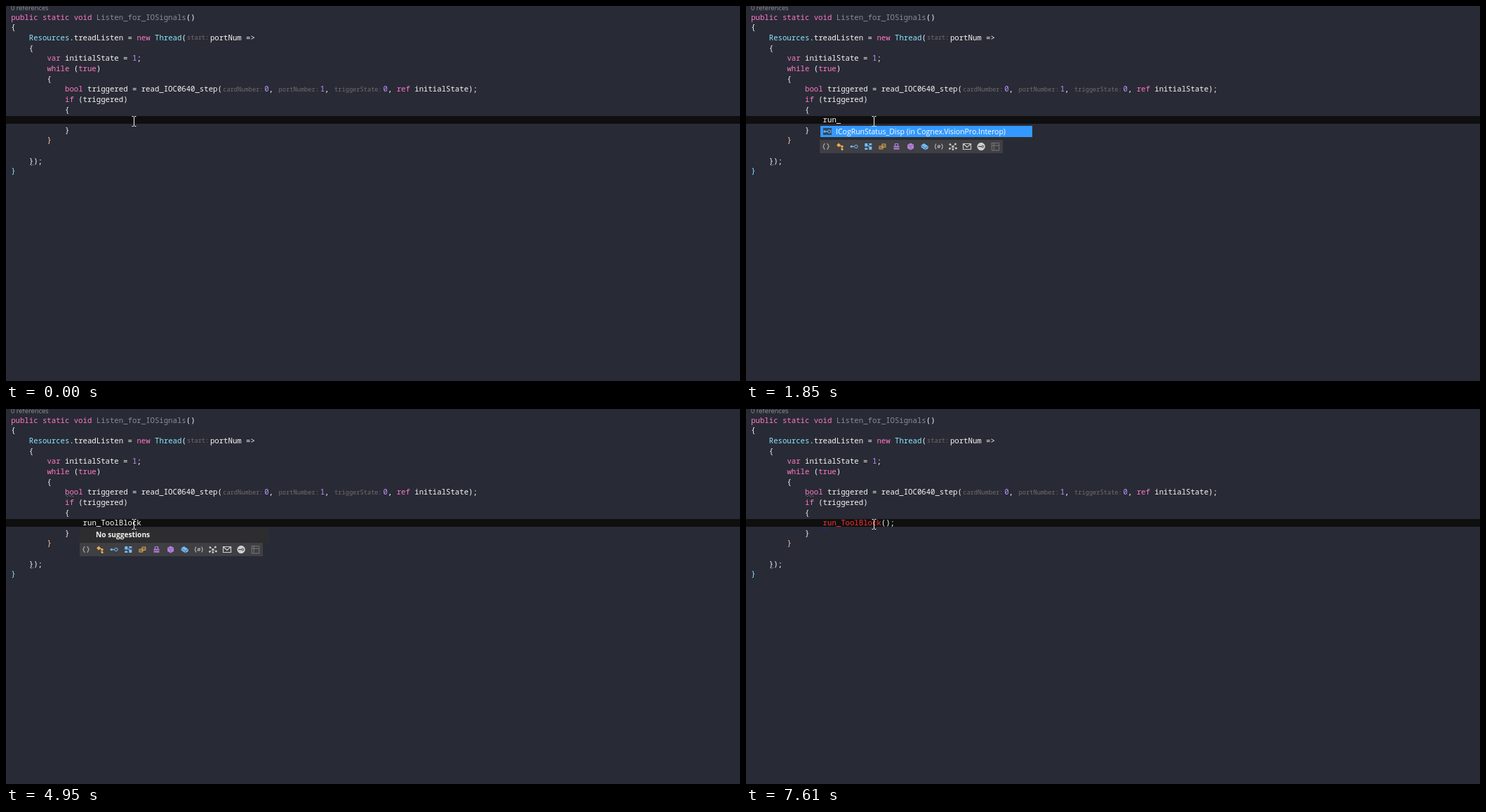
Animation, 1046 px wide and 535 px high, one loop 8000 ms. Source, as an HTML page:

```html
<!DOCTYPE html>
<html lang="en">
<head>
<meta charset="utf-8">
<title>Typing in a code editor</title>
<style>
html, body { margin: 0; width: 100%; height: 100%; overflow: hidden; background: #282a36; }
svg { display: block; width: 1046px; height: 535px; }
text { white-space: pre; }
.code { font: 10.667px "Noto Sans Mono", monospace; }
.hint { font: 8.7px "Noto Sans Mono", monospace; }
.ui { font: 10.5px "Open Sans", sans-serif; }
</style>
</head>
<body>
<svg id="stage" viewBox="0 0 1046 535" xmlns="http://www.w3.org/2000/svg"></svg>
<script>
const LOOP = 8000, LEFT = 7.2, CHAR = 6.4, LINE = 14.64, BASE = 19.8;
const INK = { w: '#f8f8f2', p: '#ff79c6', c: '#8be9fd', n: '#bd93f9', g: '#8c8d92', h: '#716d6b', o: '#ffc9a3', r: '#ff2f2f' };
const BLUE = '#75beff', ORANGE = '#e8ab53', PURPLE = '#b180d7', GREY = '#d0d0d0';

const rect = (x, y, w, h, fill, more = '') =>
  `<rect x="${x}" y="${y}" width="${w}" height="${h}" fill="${fill}" ${more}/>`;
const path = (d, stroke, width = 1, fill = 'none') =>
  `<path d="${d}" fill="${fill}" stroke="${stroke}" stroke-width="${width}"/>`;
const ring = (x, y, r, stroke, fill = 'none') =>
  `<circle cx="${x}" cy="${y}" r="${r}" fill="${fill}" stroke="${stroke}"/>`;
const label = (x, y, body, cls, fill, more = '') =>
  `<text x="${x}" y="${y}" class="${cls}" fill="${fill}" ${more}>${body}</text>`;
const at = (x, y, body) => `<g transform="translate(${x} ${y})">${body}</g>`;
const colX = col => LEFT + col * CHAR;
const lineY = row => BASE + row * LINE;

// Each run is a colour key followed by its text; "h" marks an inline parameter hint.
function codeLine(row, col, runs) {
  let x = colX(col);
  return runs.map(run => {
    const key = run[0], str = run.slice(1);
    if (key === 'h') {
      const hint = label(x + 1.2, lineY(row) - 0.6, str, 'hint', INK.h);
      x += str.length * 5.22 + 2.8;
      return hint;
    }
    const out = label(x, lineY(row), str.replace('>', '&gt;'), 'code', INK[key]);
    x += str.length * CHAR;
    return out;
  }).join('');
}

const program = [
  [0, 0, 'ppublic static void ', 'gListen_for_IOSignals', 'w()'],
  [1, 0, 'w{'],
  [2, 4, 'cResources', 'w.treadListen = ', 'pnew ', 'cThread', 'w(', 'hstart:', 'wportNum =>'],
  [3, 4, 'w{'],
  [4, 8, 'pvar ', 'winitialState = ', 'n1', 'w;'],
  [5, 8, 'pwhile ', 'w(', 'ptrue', 'w)'],
  [6, 8, 'w{'],
  [7, 12, 'pbool ', 'wtriggered = read_IOC0640_step(', 'hcardNumber:', 'n0', 'w, ', 'hportNumber:', 'n1', 'w, ',
    'htriggerState:', 'n0', 'w, ', 'pref ', 'winitialState);'],
  [8, 12, 'pif ', 'w(triggered)'],
  [9, 12, 'w{'],
  [11, 12, 'w}'],
  [12, 8, 'o}'],
  [14, 4, 'w});'],
  [15, 0, 'c}']
];

function dots(x, y, count, color) {
  let out = '';
  for (let i = 0; i < count; i++) out += rect(x + i * 2, y + i % 2, 1, 1, color);
  return out;
}

const icon = {
  braces: path('M-1.5-4Q-3-4-3-2.5T-4.5 0Q-3 0-3 2T-1.5 4M1.5-4Q3-4 3-2.5T4.5 0Q3 0 3 2T1.5 4', GREY),
  type: path('M-2-1H2V3H3', ORANGE) + path('M-5-2L-2-5L1-2L-2 1ZM1 0L3-2L5 0L3 2ZM1 4L3 2L5 4L3 6Z', 'none', 0, ORANGE),
  face: path('M-5 0H0', BLUE, 1.3) + ring(-4, 0, 1.2, BLUE) + ring(2.7, 0, 2.2, BLUE),
  struct: path('M-5-4.5H-1V0H-5ZM1-4.5H5V-2H1ZM-5 2H-1V4.5H-5ZM1 0H5V4.5H1Z', 'none', 0, BLUE) +
    path('M-1-1H1V1', BLUE),
  list: path('M-.5-3.5H4.5V1H-.5ZM-4.5-.5H.5V3.5H-4.5Z', ORANGE) + path('M1-1.2H3.5M-3.2 1.5H-.8', ORANGE),
  action: path('M-2-1V-4H2V-1', PURPLE, 1.2) + rect(-4, -1, 8, 2, PURPLE) + rect(-4, 2, 8, 2.2, PURPLE),
  cube: path('M0-5L4.5-2.7V2.5L0 5L-4.5 2.5V-2.7Z', 'none', 0, PURPLE) + path('M-3.8-2.3L0-.4L3.8-2.3M0-.4V4', '#7d579c', .7),
  box: path('M-5-2L-1-4.5L5-.5V2.5L1 5L-5 1Z', 'none', 0, BLUE) + path('M-4.5-1.5L1 2L4.5 0M1 2V4.5', '#35536d', .8),
  value: path('M-4-4Q-7 0-4 4M4-4Q7 0 4 4', GREY) + ring(0, 0, 1.7, GREY) + path('M-2 2L2-2', GREY, .8),
  group: [[-4, -3], [3.5, -3.5], [0, 0], [-4.5, 3], [0, 4], [4.5, 2.5]].map(p => ring(p[0], p[1], 1, GREY, GREY)).join('') +
    path('M-4-3L0 0L3.5-3.5M-4.5 3L0 0L4.5 2.5M0 0V4', GREY, .6),
  mail: path('M-5.5-4H5.5V4H-5.5ZM-5.5-4L0 1L5.5-4', GREY, 1.2),
  key: ring(0, 0, 5.2, GREY, GREY) + path('M-4 0H1', '#3f3f46', 1.2) + ring(2.2, 0, 1.4, '#3f3f46'),
  grid: `<rect x="-5" y="-5" width="10.5" height="10.5" fill="none" stroke="#aaa" stroke-dasharray="1 1"/>` +
    path('M-2-5V5M-5-1.5H5', '#888', .8)
};

function toolbar(y) {
  const icons = Object.values(icon).map((body, i) => at(114 + i * 20.1, y + 9.5, body));
  return rect(105, y, 261, 19, '#3f3f44') + icons.join('');
}

const matches = ['RuntimeArgumentHandle', 'RuntimeFieldHandle', 'RuntimeMethodHandle', 'RuntimeTypeHandle',
  ...['AcqFifo', 'FitCircle', 'FitEllipse'].flatMap(tool =>
    ['', 'Diag'].map(kind => `Cog${tool}LastRunRecord${kind}Constants`)),
  'CogFitLineLastRunRecordConstants'];

function matchList(typed) {
  let out = rect(105, 170, 270, 185, '#2d2d2f') + rect(106, 171, 262, 16, '#3399ff') +
    rect(368, 170, 6.5, 185, '#3e3e42') + rect(368, 171, 6, 32.5, '#68686a');
  matches.forEach((name, i) => {
    const y = 179 + i * 16.4;
    const part = 'Run'.slice(0, typed.length);
    const body = i ? name.replace(part, `<tspan fill="#a99cf0">${part}</tspan>`) : name;
    if (!i) out += rect(110.5, 173.5, 11, 11, '#2d2d30');
    out += at(116, y, icon[i < 4 ? 'struct' : 'list']) + label(128, y + 3.7, body, 'ui', '#f1f1f1');
  });
  return out + toolbar(355.5);
}

function singleMatch() {
  return rect(105, 170, 303, 21, '#2d2d2f') + rect(106, 171, 302, 16, '#3399ff') +
    rect(110, 174, 12, 10, '#2d4a66') + at(116, 179, icon.face) +
    label(128, 182.7, 'ICogRunStatus_Disp (in Cognex.VisionPro.Interop)', 'ui', '#fff') + toolbar(191);
}

function noMatch() {
  return rect(105, 170, 270, 21, '#2d2d2f') +
    label(128, 182.7, 'No suggestions', 'ui', '#f1f1f1', 'style="font-size:10.2px;font-weight:700"') + toolbar(191);
}

const popups = { list: matchList, single: singleMatch, none: noMatch };

// start time, typed text, caret column (-1 = blinked off), popup, flags: r red, b brackets lit
const steps = [
  [0, '', -1], [230, '', 0],
  [770, 'r', 1], [840, 'r', 1, 'list'], [990, 'ru', 2, 'list'], [1140, 'run', 3, 'list'],
  [1690, 'run_', 4, 'list'], [1770, 'run_', 4, 'single'], [1850, 'run_', -1, 'single'], [2000, 'run_', 4, 'single'],
  [2380, 'run_T', 5, 'none'], [2790, 'run_To', 6, 'none'], [2920, 'run_Too', 7, 'none'],
  [3170, 'run_Tool', 8, 'none'], [3390, 'run_Tool', -1, 'none'], [3690, 'run_ToolB', 9, 'none'],
  [3950, 'run_ToolB', -1, 'none'], [4020, 'run_ToolBl', 10, 'none'], [4240, 'run_ToolBlo', 11, 'none'],
  [4390, 'run_ToolBloc', 12, 'none'], [4550, 'run_ToolBlock', 13, 'none'], [4950, 'run_ToolBlock', -1, 'none'],
  [5280, 'run_ToolBlock()', 14, '', 'b'], [5420, 'run_ToolBlock()', 15, '', 'b'],
  [5510, 'run_ToolBlock()', 15, '', 'rb'], [5590, 'run_ToolBlock();', 16, '', 'rb'],
  [5820, 'run_ToolBlock();', -1, '', 'rb'], [5910, 'run_ToolBlock();', 16, '', 'r'],
  [6370, 'run_ToolBlock();', 15, '', 'rb'], [6600, 'run_ToolBlock();', -1, '', 'rb'],
  [7060, 'run_ToolBlock();', 11, '', 'rb'], [7290, 'run_ToolBlock();', 11, '', 'r'],
  [7610, 'run_ToolBlock();', -1, '', 'r']
];

const stage = document.getElementById('stage');
stage.innerHTML = rect(0, 0, 1046, 535, '#282a36') + rect(0, 157, 1046, 11, '#0f0f0f') +
  label(7, 6.4, '0 references', 'ui', '#929398', 'style="font-size:9.3px"') +
  program.map(([row, col, ...runs]) => codeLine(row, col, runs)).join('') +
  dots(34, 226, 3, '#69b8a0') + '<g id="live"></g>' +
  path('M179.5 157.5H181.5L182.5 158.5L183.5 157.5H185.5M182.5 158V171M179.5 171.5H181.5L182.5 170.5L183.5 171.5H185.5', '#f4f4f4');
const live = document.getElementById('live');

function view([start, text, caret, popup, flags = '']) {
  const red = flags.includes('r');
  let out = start >= 4550 ? dots(85, 123, 6, '#57a64a') : '';
  if (flags.includes('b')) out += rect(193, 156, 13, 13, '#bdbeb6');
  out += codeLine(10, 16, [(red ? 'r' : 'w') + text.slice(0, 13), 'w' + text.slice(13)]);
  if (red) out += dots(109, 169, 5, '#1c2bd8');
  if (popup) out += popups[popup](text);
  if (caret >= 0) out += rect(Math.floor(colX(16 + caret) + 0.3), 155, 1, 14, '#f4f4f4');
  return out;
}

let shown = null;
function draw(t) {
  const step = steps.findLast(s => s[0] <= t);
  if (step === shown) return;
  shown = step;
  live.innerHTML = view(step);
}

function tick() {
  draw(performance.now() % LOOP);
  requestAnimationFrame(tick);
}
tick();
</script>
</body>
</html>
```
